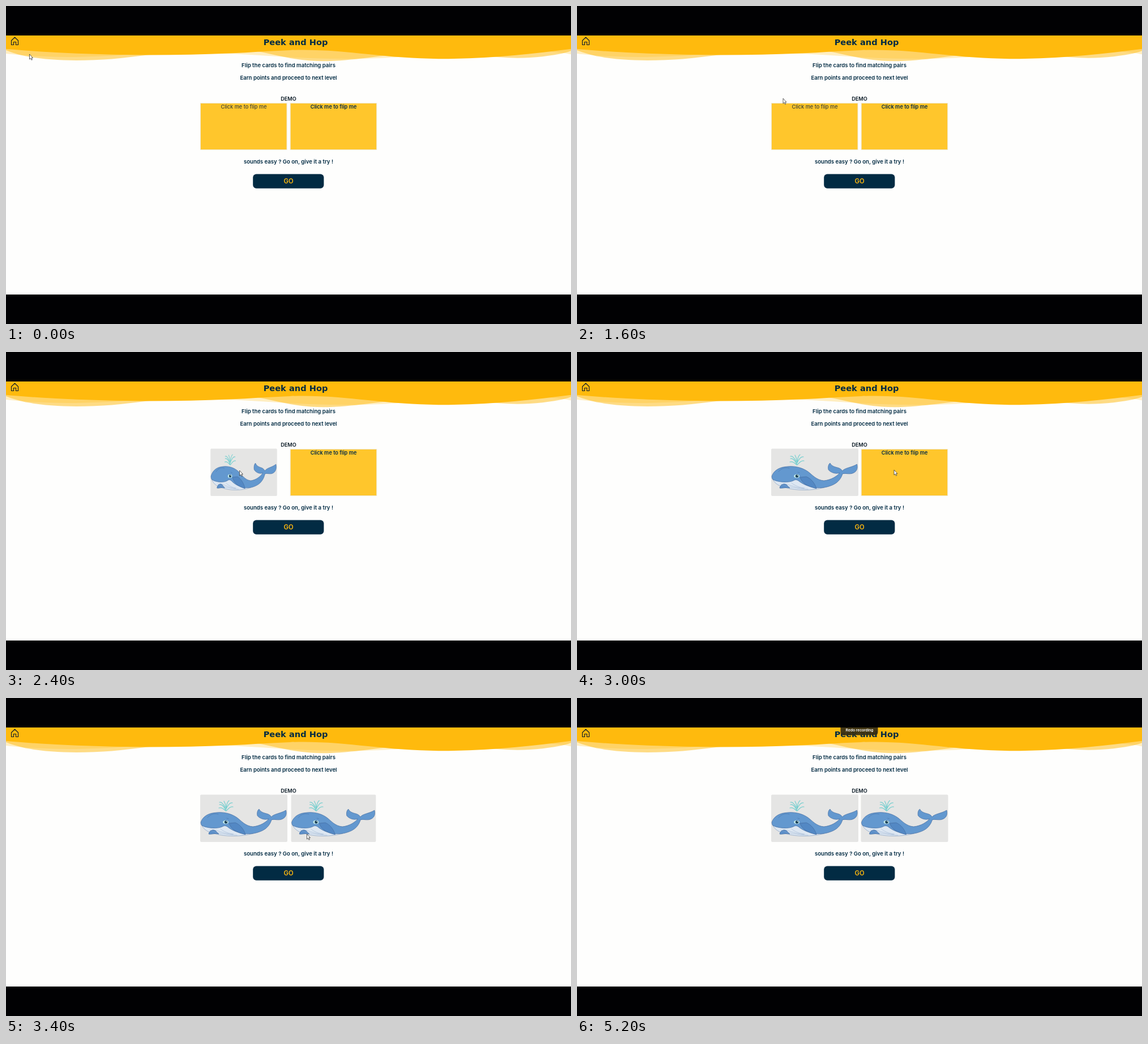
Write an HTML page that moves like this. It is 998 px wide and 561 px high and loops after 5.4 s.

```html
<!DOCTYPE html>
<html lang="en">
<head>
<meta charset="utf-8">
<title>Card pairs demo</title>
<style>
  html, body { margin: 0; width: 100%; height: 100%; overflow: hidden; background: #000; }
  svg { display: block; width: 100vw; height: 100vh; }
  text { font: 600 9.6px Inter, "DejaVu Sans", sans-serif; fill: #022b43; text-anchor: middle; }
  .title { font: 700 14.6px "DejaVu Sans", sans-serif; }
  .label { font-size: 9.2px; fill: #0b1a26; }
  .card text { font-size: 9.2px; }
  #left text { font-weight: 500; fill: #3d4436; }
  .go { font-size: 11.3px; fill: #ffb90f; }
  .face { fill: #ffc62c; stroke: #eee5cc; }
  .status text { font: 5.7px "Open Sans", sans-serif; fill: #5a5d61; text-anchor: start; }
  .tip text { font: 500 7.2px Roboto, sans-serif; fill: #fff; }
  .wave { fill: #ffba0d; }
  .line { fill: none; stroke-linecap: round; stroke-linejoin: round; }
  #left { transform-origin: 420px 212px; }
  #right { transform-origin: 578.5px 212px; }
</style>
</head>
<body>
<svg viewBox="0 0 998 561" preserveAspectRatio="none">
  <defs>
    <clipPath id="page"><rect y="52" width="998" height="457"/></clipPath>
    <g id="whale">
      <rect x="343" y="170.5" width="154" height="83.5" rx="2" fill="#e5e5e4"/>
      <g class="line" stroke="#74cfcf" stroke-width="1.2">
        <path d="M388 199C389 192 388 187 385 182M388 197C384 190 381 187 377 188M388 197C392 188 396 184 400 185M387 193C383 185 380 183 377 184M389 193C390 186 391 183 394 181M388 199C383 194 379 193 376 194M389 199C394 194 397 191 401 192"/>
      </g>
      <g stroke="#426b9f" stroke-width=".7" stroke-linejoin="round">
        <path fill="#dde7f2" stroke-width=".4" d="M346 225C350 233 358 237 369 239.500C388 245 415 245 437 239L420 224L383 222Z"/>
        <path fill="#6398cf" d="M344 219.500C346 212 354 204 368 202.500C384 200 398 204 408 211C416 217 423 226 436 227C449 226 461 218 464 213C458 216 448 213 444 207.500C443 203 444 198 447 196C450 202 457 203 462 204.500C466 206 468 208 468.500 210C473 204 485 204 494.500 198C496 204 495 210 489 213C482 217 474 213 469 215C466 225 459 233 445 237C436 240 426 240 420 239C410 238 398 233 391 227C388 225 385 225 382 227C374 231 355 230 346 225Q344 223 344 219.500Z"/>
        <path fill="#5388c4" d="M394 221C398 232 407 237 423 241C420 231 413 223 405 220Z"/>
        <path fill="#5b8fc9" d="M358 240C359 234 365 231 370 234L376 240C369 238 364 241 358 240Z"/>
      </g>
      <g class="line" stroke="#8fa9ca" stroke-width=".5">
        <path d="M360 233C374 239 390 241 408 242M370 233C381 237 392 240 401 241M379 231C385 236 393 239 402 240"/>
        <path d="M356 211C361 205 368 203 375 205M390 212L393 213" stroke="#426b9f"/>
      </g>
      <ellipse cx="388" cy="219" rx="5" ry="3.200" fill="#bfe6e8"/>
      <circle cx="388.500" cy="218.800" r="2.600" fill="#173e55"/>
      <circle cx="389.500" cy="217.800" r=".8" fill="#fff"/>
    </g>
  </defs>

  <rect width="998" height="561" fill="#010103"/>
  <g clip-path="url(#page)">
    <rect y="52" width="998" height="457" fill="#fefefd"/>

    <rect class="wave" y="52" width="998" height="23"/>
    <g class="wave" transform="translate(0 74.600) scale(.83167 .205)">
      <path opacity=".25" d="M0 0V46C48 68 104 78 158 74C228 69 294 41 365 37C439 32 512 54 583 72C652 90 721 97 792 85C829 79 862 67 897 56C989 25 1113 -14 1200 52V0Z"/>
      <path opacity=".5" d="M0 0V16C13 37 28 57 48 72C99 111 165 111 225 92C256 81 285 66 314 52C355 33 399 6 445 2C481 -1 516 12 544 34C575 59 606 96 647 107C688 118 729 100 766 82C804 65 842 43 883 39C943 34 997 62 1052 78C1082 87 1111 84 1139 71C1162 60 1187 44 1200 21V0Z"/>
      <path d="M0 0V6C150 59 314 71 476 43C519 35 560 22 603 16C662 7 716 28 769 51C828 77 886 95 951 90C1038 83 1124 44 1200 5V0Z"/>
    </g>

    <path class="line" stroke="#14212b" stroke-width="1.200" d="M9.500 61L15.500 55.300L21.500 61V68.500H17.500V63.500H13.500V68.500H9.500Z"/>
    <path id="underline" d="M6 72.300H24" stroke="#14212b" stroke-width="1.300"/>

    <text class="title" x="511.500" y="68.500">Peek and Hop</text>
    <text x="499" y="108">Flip the cards to find matching pairs</text>
    <text x="499" y="130">Earn points and proceed to next level</text>
    <text class="label" x="499" y="166.500">DEMO</text>

    <g id="left" class="card">
      <g class="front">
        <rect class="face" x="343.500" y="171.500" width="152.500" height="82"/>
        <text x="420" y="180.500">Click me to flip me</text>
      </g>
      <use class="back" href="#whale"/>
    </g>
    <g id="right" class="card">
      <g class="front">
        <rect class="face" x="502.200" y="171.500" width="152.500" height="82"/>
        <text x="578.500" y="180.500">Click me to flip me</text>
      </g>
      <use class="back" href="#whale" x="158.500"/>
    </g>

    <text x="499" y="277.500">sounds easy ? Go on, give it a try !</text>
    <rect x="436.200" y="296.500" width="125.200" height="25.200" rx="6" fill="#022b43"/>
    <text class="go" x="499" y="313">GO</text>

    <g id="status" class="status">
      <path d="M0 497.500H160Q162 497.500 162 499.500V509H0Z" fill="#dfe1e5"/>
      <text x="2.500" y="505.300">pages.lumo-varn.example/mp4-pair-deck-game/index.html</text>
    </g>

    <g id="tip" class="tip">
      <path d="M465.500 52H531.500V60Q531.500 65.500 526 65.500H471Q465.500 65.500 465.500 60Z" fill="#352d16" opacity=".92"/>
      <text x="499" y="59.400">Redo recording</text>
    </g>

    <g id="cursor" stroke="#222" stroke-width=".7" fill="#fff" stroke-linejoin="round">
      <path id="arrow" d="M0 0V9L2 7.200L3.500 10.300L4.900 9.700L3.500 6.600H6Z"/>
      <path id="hand" d="M-.8 1Q.2 -.2 1 1V5L6 6Q7.300 6.500 7 8L6 12.500H.8L-3 8Q-2.500 6.500 -.8 8Z"/>
    </g>
  </g>
</svg>
<script>
  const LOOP = 5400, STEP = 200, FLIP = 600;
  const $ = id => document.getElementById(id);

  // time, x, y: the pointer holds each place until the next
  const path = [
    [0, 41.5, 85], [200, 31, 76], [400, 25, 67], [600, 16.5, 64],
    [1400, 150, 102], [1600, 364, 163], [1800, 393, 193], [2000, 412.5, 209],
    [2600, 520, 214], [2800, 560, 208], [3400, 531.5, 240], [3600, 520, 272],
    [3800, 502, 300], [4000, 491, 302], [4200, 489, 302], [4800, 500, 180],
    [5000, 498, 50]
  ];

  const bezier = (a, b, s) => 3 * (1 - s) * s * ((1 - s) * a + s * b) + s ** 3;

  function ease(x) {
    if (x <= 0) return 0;
    if (x >= 1) return 1;
    let lo = 0, hi = 1;
    for (let i = 0; i < 24; i++) {
      const mid = (lo + hi) / 2;
      if (bezier(.25, .25, mid) < x) lo = mid; else hi = mid;
    }
    return bezier(.1, 1, lo);
  }

  function show(el, on) { el.style.display = on ? "" : "none"; }

  function turn(id, t, start) {
    const c = Math.cos(Math.PI * ease((t - start) / FLIP));
    const card = $(id);
    card.style.transform = `scaleX(${Math.abs(c)})`;
    show(card.querySelector(".front"), c > 0);
    show(card.querySelector(".back"), c <= 0);
  }

  function draw() {
    const t = Math.floor(performance.now() % LOOP / STEP) * STEP;
    const [, x, y] = path.filter(p => p[0] <= t).pop();
    const home = t >= 600 && t < 1400;
    const button = t >= 3800 && t < 4800;

    $("cursor").setAttribute("transform", `translate(${x} ${y})`);
    show($("cursor"), t < 5200);
    show($("hand"), home || button);
    show($("arrow"), !home && !button);
    show($("underline"), home);
    $("status").style.opacity = t === 800 ? .6 : t >= 1000 && t < 1600 ? 1 : 0;
    show($("tip"), t >= 5200);
    turn("left", t, 2115);
    turn("right", t, 3000);
  }

  function tick() {
    draw();
    requestAnimationFrame(tick);
  }
  tick();
</script>
</body>
</html>
```
